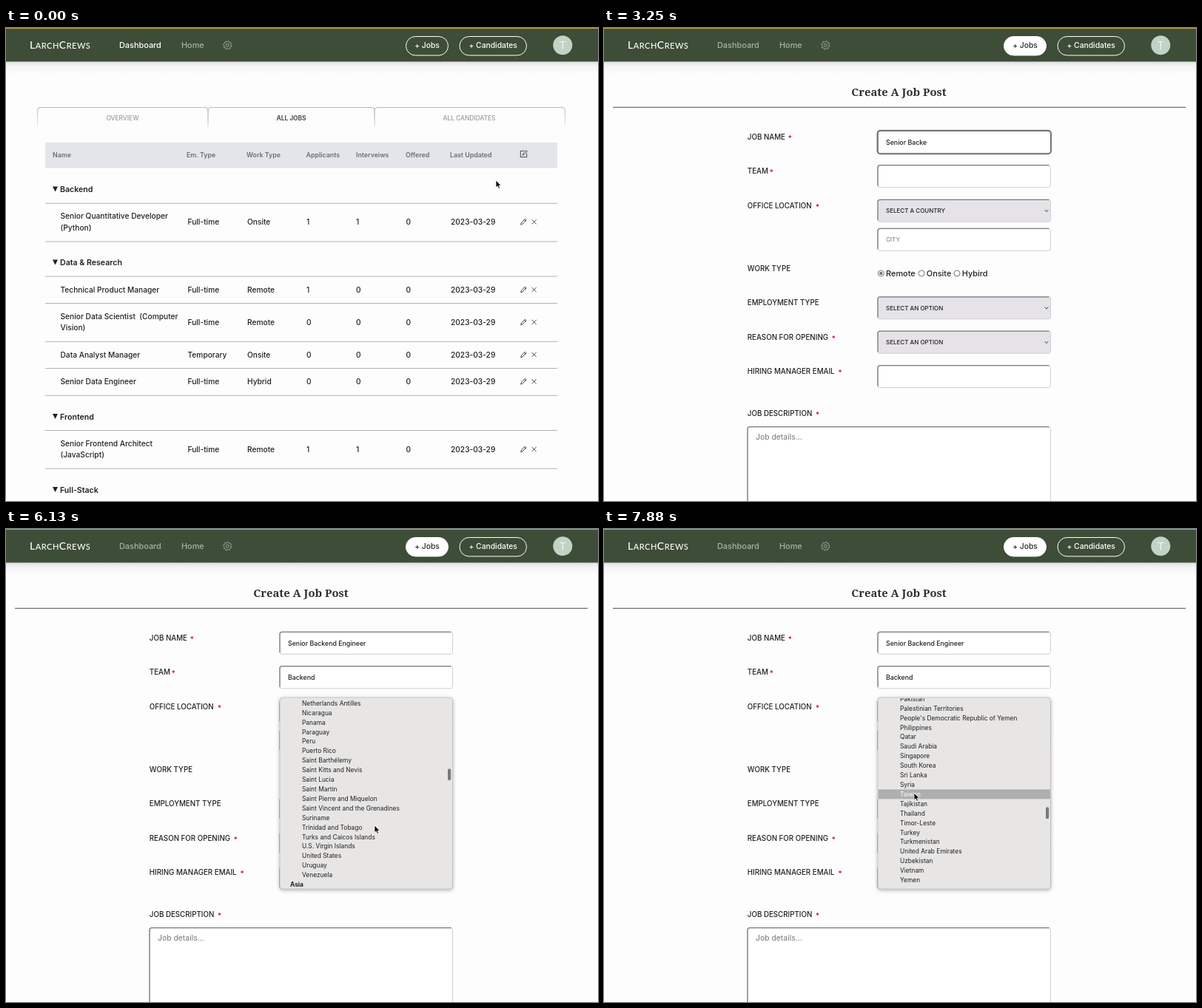
Animation of 800x640 px, one loop 8 s. Source, as an HTML page:

```html
<!DOCTYPE html>
<html lang="en">
<head>
<meta charset="utf-8">
<title>Create a job post</title>
<style>
  html, body { margin: 0; width: 100%; height: 100%; overflow: hidden; background: #fefdfe; }
  svg { display: block; }
  text { font: 500 10.2px Inter, "Open Sans", sans-serif; fill: #1f1f21; white-space: pre; }
  .mid { text-anchor: middle; }
  .brand { font: 500 14px Lato, sans-serif; fill: #fff; letter-spacing: .5px; }
  .brand .small { font-size: 11px; }
  .nav { font-size: 10.9px; fill: #a9b2a5; }
  .button { font-size: 10.3px; fill: #fff; }
  .tab { font-size: 8.4px; fill: #98989b; }
  .tab.on { font-weight: 700; fill: #4e4e52; }
  .head { font-size: 8.8px; font-weight: 600; fill: #6d6e74; }
  .group { font-size: 10.6px; font-weight: 600; }
  .title { font: 700 14.8px "Noto Serif", serif; fill: #2f2f31; }
  .label { font-size: 9.75px; }
  .star { font-size: 10px; font-weight: 700; fill: #e0202c; }
  .value { font-size: 8.8px; }
  .pick { font-size: 8px; }
  .hint { font-size: 8px; fill: #86868a; }
  .area { font-size: 10.4px; font-weight: 400; fill: #77777b; }
  .radio { font-size: 10.9px; }
  .item { font-size: 8.4px; font-weight: 400; }
  .item.region { font-weight: 700; }
  .item.lit { fill: #fff; }
  .suggest { font-size: 7.8px; font-weight: 400; }
  .thin { fill: none; stroke: #333; stroke-width: .9; stroke-linecap: round; stroke-linejoin: round; }
</style>
</head>
<body>
<svg id="stage" width="800" height="640" viewBox="0 0 800 640"></svg>
<script>
const LOOP = 8000, STEP = 125, PITCH = 12.91, TOP = 235;
const JOB = 'Senior Backend Engineer';

const REGIONS = {
  Africa: 'Algeria,Angola,Benin,Botswana,Burkina Faso,Burundi,Cameroon,Cape Verde,Central African Republic,Chad,Comoros,Congo - Brazzaville,Congo - Kinshasa,Côte d’Ivoire,Djibouti,Egypt,Equatorial Guinea,Eritrea,Ethiopia,Gabon,Gambia,Ghana,Guinea,Guinea-Bissau,Kenya,Lesotho,Liberia,Libya,Madagascar,Malawi,Mali,Mauritania,Mauritius,Mayotte,Morocco,Mozambique,Namibia,Niger,Nigeria,Rwanda,Réunion,Saint Helena,Senegal,Seychelles,Sierra Leone,Somalia,South Africa,Sudan,Swaziland,São Tomé and Príncipe,Tanzania,Togo,Tunisia,Uganda,Western Sahara,Zambia,Zimbabwe',
  Americas: 'Anguilla,Antigua and Barbuda,Argentina,Aruba,Bahamas,Barbados,Belize,Bermuda,Bolivia,Brazil,British Virgin Islands,Canada,Cayman Islands,Chile,Colombia,Costa Rica,Cuba,Dominica,Dominican Republic,Ecuador,El Salvador,Falkland Islands,French Guiana,Greenland,Grenada,Guadeloupe,Guatemala,Guyana,Haiti,Honduras,Jamaica,Martinique,Mexico,Montserrat,Netherlands Antilles,Nicaragua,Panama,Paraguay,Peru,Puerto Rico,Saint Barthélemy,Saint Kitts and Nevis,Saint Lucia,Saint Martin,Saint Pierre and Miquelon,Saint Vincent and the Grenadines,Suriname,Trinidad and Tobago,Turks and Caicos Islands,U.S. Virgin Islands,United States,Uruguay,Venezuela',
  Asia: "Afghanistan,Armenia,Azerbaijan,Bahrain,Bangladesh,Bhutan,Brunei,Cambodia,China,Cyprus,Georgia,Hong Kong SAR China,India,Indonesia,Iran,Iraq,Israel,Japan,Jordan,Kazakhstan,Kuwait,Kyrgyzstan,Laos,Lebanon,Macau SAR China,Malaysia,Maldives,Mongolia,Myanmar [Burma],Nepal,Neutral Zone,North Korea,Oman,Pakistan,Palestinian Territories,People's Democratic Republic of Yemen,Philippines,Qatar,Saudi Arabia,Singapore,South Korea,Sri Lanka,Syria,Taiwan,Tajikistan,Thailand,Timor-Leste,Turkey,Turkmenistan,United Arab Emirates,Uzbekistan,Vietnam,Yemen"
};
const rows = ['SELECT A COUNTRY'];
for (const region in REGIONS) rows.push(region, ...REGIONS[region].split(','));

// Motion tables: time, then values
const POINTER = [
  [0, 662, 206], [750, 572, 24], [1375, 572, 24], [1875, 394, 139], [2250, 400, 153],
  [4125, 400, 153], [4250, 402, 200], [4500, 402, 226], [4875, 402, 226], [5125, 480, 247],
  [5250, 484, 252], [5375, 492, 429], [5500, 492, 429], [6125, 498, 401], [6875, 431, 454],
  [7125, 431, 454], [7750, 419, 357], [7875, 419, 357]
];
const SCROLL = [
  [5250, 0], [5375, 322], [5500, 369.4], [5750, 760], [6000, 1140], [6125, 1212.7],
  [6375, 1290], [6875, 1665.7], [7125, 1665.7], [7625, 1890], [7750, 1903]
];

const text = (x, y, s, cls = '', more = '') =>
  `<text x="${x}" y="${y}" class="${cls}" ${more}>${s.replace(/&/g, '&amp;')}</text>`;
const rect = (x, y, w, h, fill, more = '') =>
  `<rect x="${x}" y="${y}" width="${w}" height="${h}" fill="${fill}" ${more}/>`;
const path = (d, more = 'class="thin"') => `<path d="${d}" ${more}/>`;
const rule = (x1, x2, y, color) => path(`M${x1} ${y}H${x2}`, `stroke="${color}"`);

function gear(x, y) {
  let d = '';
  for (let i = 0; i < 32; i++) {
    const a = (i + .5) * Math.PI / 16, r = i % 4 < 2 ? 5.7 : 4.5;
    d += `${i ? 'L' : 'M'}${(x + r * Math.cos(a)).toFixed(2)} ${(y + r * Math.sin(a)).toFixed(2)}`;
  }
  return `<g fill="none" stroke="#a9b2a5" stroke-width=".9">${path(d + 'Z', '')}<circle cx="${x}" cy="${y}" r="2"/></g>`;
}

function header() {
  const small = s => `<tspan class="small">${s}</tspan>`;
  return rect(0, 45, 800, 18, 'url(#fall)') + rect(0, 0, 800, 45.5, '#3e4d37') + rect(0, 0, 800, 1, '#bfa04c') +
    text(32, 28, `L${small('ARCH')}C${small('REWS')}`, 'brand') +
    text(153, 27, 'Dashboard', 'nav', 'id="dash"') + text(237, 27, 'Home', 'nav') + gear(299.3, 23.3) +
    rect(540.5, 11.5, 57, 25.5, 'none', 'id="jobs" rx="12.75" stroke="#fff"') +
    text(569, 27.2, '+ Jobs', 'button mid', 'id="jobsText"') +
    rect(613, 11.5, 90.5, 25.5, 'none', 'rx="12.75" stroke="#fff"') +
    text(658.2, 27.2, '+ Candidates', 'button mid') +
    '<circle cx="752.3" cy="23.2" r="13" fill="#c1d2c7"/>' +
    text(752.3, 28.7, 'T', 'mid', 'id="initial" style="font-size:15px;font-weight:400;fill:#eef4ef"');
}

function tools(y) {
  return path(`M695.8 ${y + 3.4}l.7-2.4 4.9-4.9 1.7 1.7-4.9 4.9zM700.2 ${y - 2.7}l1.7 1.7`) +
    path(`M710.8 ${y - 2.8}l5.6 5.6m0-5.6l-5.6 5.6`);
}

function job(y, name, type, place, applied, met) {
  const b = y + 3.7, lines = name.split('|');
  const cells = [[245.5, type], [326, place], [406, applied], [473, met], [540.5, '0'], [601, '2023-03-29']];
  return lines.map((s, i) => text(73.5, b + (i - (lines.length - 1) / 2) * 15.2, s)).join('') +
    cells.map(([x, s]) => text(x, b, s)).join('') + tools(y);
}

function dashboard() {
  const tab = (l, r) => path(`M${l} 134V112Q${l} 107.5 ${l + 5} 107.5H${r - 5}Q${r} 107.5 ${r} 112V134`,
    'fill="none" stroke="url(#fade)" stroke-width="1.1"');
  const group = (y, s) => path(`M63 ${y - 3.6}h7l-3.5 7z`, 'fill="#1f1f21"') + text(73, y + 3.9, s, 'group');
  const heads = [[63, 'Name'], [244, 'Em. Type'], [325, 'Work Type'], [405.5, 'Applicants'],
    [473, 'Interveiws'], [540, 'Offered'], [600, 'Last Updated']];
  return tab(42.5, 273) + tab(273, 498) + tab(498, 755.5) +
    text(157.5, 124.5, 'OVERVIEW', 'tab mid') + text(385.5, 124.5, 'ALL JOBS', 'tab on mid') +
    text(626, 124.5, 'ALL CANDIDATES', 'tab mid') +
    rect(53, 155, 692, 34.5, '#e4e5ea') + heads.map(([x, s]) => text(x, 175, s, 'head')).join('') +
    path('M700 166.3h-4.7v8.4h8.4v-4.6M698.3 171.7l.4-1.8 4.3-4.3 1.4 1.4-4.3 4.3z') +
    [237.3, 289, 336, 372.5, 424.3, 460.5, 497.3, 544.5, 596.2].map(y => rule(53, 745, y, '#b0b0b3')).join('') +
    group(218, 'Backend') + group(317, 'Data & Research') + group(525.7, 'Frontend') + group(624.7, 'Full-Stack') +
    job(262.3, 'Senior Quantitative Developer|(Python)', 'Full-time', 'Onsite', '1', '1') +
    job(354, 'Technical Product Manager', 'Full-time', 'Remote', '1', '0') +
    job(398, 'Senior Data Scientist  (Computer|Vision)', 'Full-time', 'Remote', '0', '0') +
    job(442, 'Data Analyst Manager', 'Temporary', 'Onsite', '0', '0') +
    job(478.3, 'Senior Data Engineer', 'Full-time', 'Hybrid', '0', '0') +
    job(570, 'Senior Frontend Architect|(JavaScript)', 'Full-time', 'Remote', '1', '1');
}

function box(x, y, w, h, fill = '#fff') {
  return rect(x, y, w, h, fill, 'rx="3" stroke="#cfcfd2"') +
    path(`M${x} ${y + h - 2}V${y + 3}Q${x} ${y} ${x + 3} ${y}H${x + w - 2}`, 'fill="none" stroke="#7b7b7f" stroke-width="1.3"');
}

function form() {
  const field = y => box(370, y, 233.5, 30);
  const select = (y, s) => box(370, y, 233.5, 30, '#e5e3e8') + text(381, y + 18, s, 'pick') +
    path(`M596 ${y + 14}l2 2.4 2-2.4`);
  const ring = (y, id) => rect(369.5, y - .5, 234.5, 31.5, 'none', `id="${id}" rx="4" stroke="#747478" stroke-width="2"`);
  const radio = (x, s) => `<circle cx="${x}" cy="332" r="4" fill="#fff" stroke="#77777a"/>` + text(x + 6.8, 335.7, s, 'radio');
  const labels = [[150.5, 'JOB NAME', 248.5], [197, 'TEAM', 223.5], [243.5, 'OFFICE LOCATION', 285.7], [329, 'WORK TYPE'],
    [375, 'EMPLOYMENT TYPE'], [421.5, 'REASON FOR OPENING', 307.5], [468, 'HIRING MANAGER EMAIL', 316.3], [524.5, 'JOB DESCRIPTION', 285.7]];
  return text(398.5, 92, 'Create A Job Post', 'title mid') + rule(12, 786, 107.3, '#4a4a4c') +
    labels.map(([y, s, star]) => text(193.8, y, s, 'label') + (star ? text(star, y + 2, '*', 'star') : '')).join('') +
    field(139.3) + field(185.7) + select(232.3, 'SELECT A COUNTRY') + field(271.3) + text(381, 289, 'CITY', 'hint') +
    radio(374.3, 'Remote') + '<circle cx="374.3" cy="332" r="2.2" fill="#77777a"/>' + radio(429, 'Onsite') + radio(477, 'Hybird') +
    select(363.8, 'SELECT AN OPTION') + select(410.2, 'SELECT AN OPTION') + field(456.7) +
    box(194, 539.7, 409.5, 120) + text(205, 556.8, 'Job details...', 'area') +
    ring(139.3, 'ringJob') + ring(185.7, 'ringTeam') +
    text(381, 157.5, '', 'value', 'id="jobValue"') + text(381, 203.9, '', 'value', 'id="teamValue"') +
    `<g id="suggest">${rect(369, 217, 235, 15, '#cfcfd0', 'filter="url(#soft)"')}${text(373.5, 226.8, 'Backend', 'suggest')}</g>`;
}

function popup() {
  const item = (s, i) => text(s in REGIONS ? 384 : 400, (TOP + i * PITCH + 3).toFixed(2), s, s in REGIONS ? 'item region' : 'item');
  return rect(370, 228, 233.5, 259, '#e7e6e5', 'rx="4" stroke="#bdbcbc" stroke-width=".8" filter="url(#soft)"') +
    `<g clip-path="url(#window)"><g id="list">${rect(370.5, 0, 232.5, 13, '#b0afb0', 'id="bar"')}${rows.map(item).join('')}</g></g>` +
    rect(597, 0, 4.2, 16, '#7a7a7b', 'id="thumb" rx="2.1"');
}

const stage = document.getElementById('stage');
stage.innerHTML = `<defs>
  <linearGradient id="fall" x2="0" y2="1"><stop stop-color="#dcdbde"/><stop offset=".35" stop-color="#f4f3f5"/><stop offset="1" stop-color="#fefdfe"/></linearGradient>
  <linearGradient id="fade" gradientUnits="userSpaceOnUse" x1="0" y1="107" x2="0" y2="134"><stop stop-color="#b9b9bc"/><stop offset="1" stop-color="#b9b9bc" stop-opacity=".25"/></linearGradient>
  <filter id="soft" x="-10%" y="-40%" width="120%" height="220%"><feDropShadow dx="0" dy="1.5" stdDeviation="2.5" flood-opacity=".3"/></filter>
  <clipPath id="window"><rect x="370" y="229" width="234" height="256"/></clipPath></defs>
  ${rect(0, 0, 800, 640, '#fefdfe')}${header()}
  <g id="board">${dashboard()}</g><g id="form">${form()}</g><g id="popup">${popup()}</g>
  ${path('M0 0V9.8L2.2 7.8 3.8 11.3 5.5 10.5 4 7.2H7Z', 'id="arrow" fill="#000" stroke="#fff" stroke-width=".8"')}
  ${path('M-2.5-5Q0-5 0-3.5Q0-5 2.5-5M0-3.5V3.5M-2.5 5Q0 5 0 3.5Q0 5 2.5 5M-1.3 1H1.3', 'id="beam" class="thin"')}`;

const el = {};
stage.querySelectorAll('[id]').forEach(n => el[n.id] = n);
const items = [...stage.querySelectorAll('.item')];
const show = (n, on) => n.style.display = on ? '' : 'none';
const within = (t, a, b) => t >= a && t < b;

function at(table, t) {
  let i = 0;
  while (i < table.length - 2 && t >= table[i + 1][0]) i++;
  const a = table[i], b = table[i + 1];
  const k = Math.min(1, Math.max(0, (t - a[0]) / (b[0] - a[0])));
  return a.slice(1).map((v, j) => v + (b[j + 1] - v) * k);
}

function litRow(t, y, scroll) {
  if (within(t, 5375, 5750)) return rows.indexOf('Nigeria');
  if (within(t, 7125, 7625)) return rows.indexOf('Oman');
  if (t >= 6875) return Math.round((y + scroll - TOP) / PITCH);
  return -1;
}

function draw(t) {
  const onForm = t >= 1875, open = t >= 5250;
  const filled = within(t, 750, 1500) || t >= 2000;
  const [x, y] = at(POINTER, t), [scroll] = at(SCROLL, t);

  show(el.board, !onForm);
  show(el.form, onForm);
  show(el.popup, open);
  el.dash.style.fill = onForm ? '' : '#fff';
  el.jobs.setAttribute('fill', filled ? '#fff' : 'none');
  el.jobsText.style.fill = filled ? '#26292a' : '';
  show(el.initial, !within(t, 1875, 2000));

  const typed = Math.ceil(JOB.length * Math.min(1, Math.max(0, (t - 2500) / 1450)));
  el.jobValue.textContent = JOB.slice(0, typed);
  el.teamValue.textContent = t >= 4875 ? 'Backend' : t >= 4500 ? 'B' : '';
  show(el.ringJob, within(t, 2250, 4250));
  show(el.ringTeam, within(t, 4250, 5250));
  show(el.suggest, within(t, 4500, 4875));

  if (open) {
    const lit = litRow(t, y, scroll);
    el.list.setAttribute('transform', `translate(0 ${-scroll})`);
    el.bar.setAttribute('y', TOP + lit * PITCH - 6.5);
    show(el.bar, lit >= 0);
    items.forEach((n, i) => n.classList.toggle('lit', i === lit));
    el.thumb.setAttribute('y', 232.6 + scroll * .0755);
  }

  const beam = within(t, 1875, 4375), hidden = within(t, 2500, 4000);
  show(el.beam, beam && !hidden);
  show(el.arrow, !beam);
  for (const n of [el.arrow, el.beam]) n.setAttribute('transform', `translate(${x} ${y})`);
}

const start = performance.now();
function tick() {
  const t = (performance.now() - start) % LOOP;
  draw(Math.floor(t / STEP) * STEP);
  requestAnimationFrame(tick);
}
tick();
</script>
</body>
</html>
```
